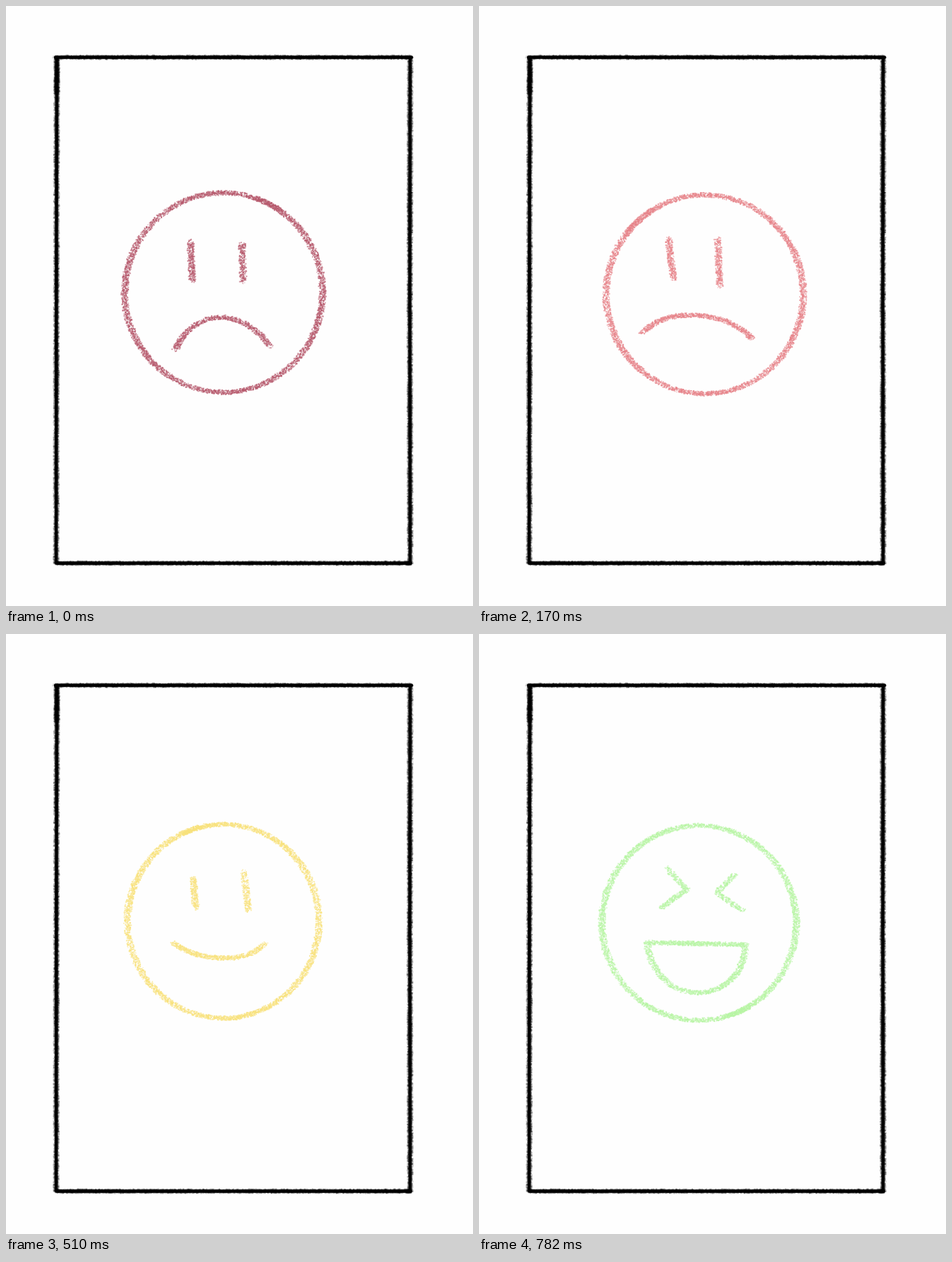
Recreate the animation shown at these times as an HTML page with a canvas. Size 661x848 px, loop 850 ms.

```html
<!DOCTYPE html>
<html lang="en">
<head>
<meta charset="utf-8">
<title>Mood faces</title>
<style>
  html, body { margin: 0; height: 100%; overflow: hidden; background: #fefefe; }
  canvas { display: block; }
</style>
</head>
<body>
<canvas id="stage" width="661" height="848"></canvas>
<script>
const W = 661, H = 848, HOLD = 170;
const ctx = document.getElementById('stage').getContext('2d');

function seeded(seed) {
  return () => {
    seed = (seed + 0x6D2B79F5) | 0;
    let t = Math.imul(seed ^ (seed >>> 15), 1 | seed);
    t = (t + Math.imul(t ^ (t >>> 7), 61 | t)) ^ t;
    return ((t ^ (t >>> 14)) >>> 0) / 4294967296;
  };
}

// A hand-drawn ellipse that runs a little past its starting angle.
function ring(cx, cy, rx, ry, start, overlap) {
  const at = deg => {
    const a = deg * Math.PI / 180;
    return `${cx + rx * Math.cos(a)} ${cy + ry * Math.sin(a)}`;
  };
  const arc = deg => `A${rx} ${ry} 0 0 1 ${at(deg)}`;
  return `M${at(start)}${arc(start + 180)}${arc(start + 360)}${arc(start + 360 + overlap)}`;
}

// Scatters grains inside an elliptical brush tip moved along the path.
function grainStroke(c, d, rand, { rx, ry, density, min, max }) {
  const path = document.createElementNS('http://www.w3.org/2000/svg', 'path');
  path.setAttribute('d', d);
  const length = path.getTotalLength();
  const phase = rand() * 6;
  for (let s = 0; s < length; s++) {
    const p = path.getPointAtLength(s);
    const flow = 1 + 0.14 * Math.sin(s / 23 + phase) + 0.1 * Math.sin(s / 61 + phase);
    for (let n = density * flow + rand(); n >= 1; n--) {
      const a = rand() * 2 * Math.PI, r = Math.sqrt(rand());
      const size = min + (max - min) * rand();
      c.fillRect(p.x + rx * r * Math.cos(a) - size / 2,
                 p.y + ry * r * Math.sin(a) - size / 2, size, size);
    }
  }
}

const border = [
  'M70 72.5H574', 'M72 73L71.5 300L71 787', 'M572 74L571.5 400L572 787',
  'M71 787.5H573', 'M72 74V124', 'M568 788H572'
];

const faces = [
  { color: '#b75a6c', strokes: [
    ring(308, 405, 140, 141, -72, 17),
    'M261 333Q262 360 264 388', 'M334 336L336 391',
    'M240 485C258 449 283 440 305 440S355 454 374 481'] },
  { color: '#e7838a', strokes: [
    ring(319.5, 407.5, 139.5, 140.5, -143, 22),
    'M269 329Q270 360 277 387', 'M338 329L341 396',
    'M231 462C252 441 280 436 303 437C335 438 365 447 386 470', 'M382 466L386 469'] },
  { color: '#eabb78', shift: [1, -0.8], strokes: [
    ring(313.5, 409.5, 133.5, 134.5, -115, 16),
    'M265 339L268 387', 'M338 332L341 393', 'M238 444L375 441'] },
  { color: '#f9e27c', strokes: [
    ring(307.5, 406, 135.5, 137, -115, 12),
    'M265 345Q266 365 269 387', 'M337 336L343 391',
    'M237 437C255 450 280 458 307 458S350 453 366 438'] },
  { color: '#b9f5a5', strokes: [
    ring(311.5, 408.5, 137.5, 137.5, 60, 14),
    'M266 331L294 361L258 387', 'M362 340L336 366L373 391',
    'M238 436L377 439C377 478 347 507 310 507C272 507 242 478 238 436'] }
];

function drawBorder(c, [dx, dy]) {
  const rand = seeded(5);
  c.save();
  c.translate(dx, dy);
  c.lineCap = 'round';
  c.lineWidth = 4.4;
  c.strokeStyle = '#050505';
  c.fillStyle = 'rgba(0,0,0,.13)';
  for (const d of border) {
    c.stroke(new Path2D(d));
    grainStroke(c, d, rand, { rx: 4, ry: 3, density: 12, min: 1.6, max: 2.6 });
  }
  c.restore();
}

function render({ color, strokes, shift = [0, 0] }, index) {
  const canvas = document.createElement('canvas');
  canvas.width = W;
  canvas.height = H;
  const c = canvas.getContext('2d');
  c.fillStyle = '#fefefe';
  c.fillRect(0, 0, W, H);
  drawBorder(c, shift);
  const rand = seeded(index + 20);
  c.globalAlpha = 0.62;
  c.fillStyle = color;
  for (const d of strokes) {
    grainStroke(c, d, rand, { rx: 5.2, ry: 3.4, density: 5.2, min: 1, max: 2.2 });
  }
  return canvas;
}

const pictures = faces.map(render);

function tick() {
  const index = Math.floor(performance.now() / HOLD) % pictures.length;
  ctx.drawImage(pictures[index], 0, 0);
  requestAnimationFrame(tick);
}
tick();
</script>
</body>
</html>
```
